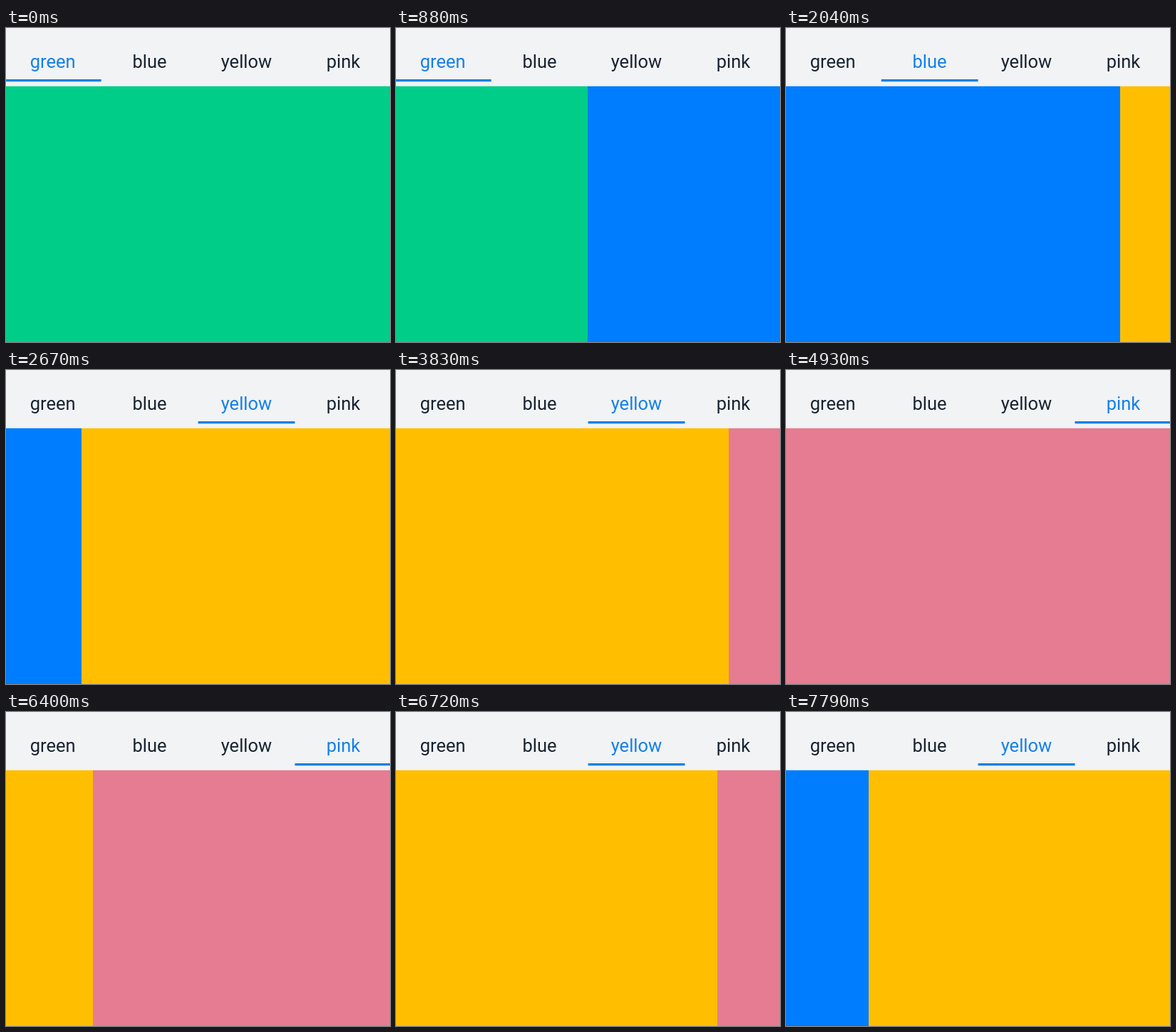
An HTML page for the animation above (8000 ms loop, 539 by 441 pixels).

```html
<!DOCTYPE html>
<html lang="en">
<head>
<meta charset="utf-8">
<title>Swipe tabs</title>
<style>
html, body { margin: 0; width: 100%; height: 100%; overflow: hidden; background: #f1f3f5; }
svg { display: block; width: 100%; height: 100%; }
text { font: 400 25.5px Roboto, sans-serif; text-anchor: middle; }
</style>
</head>
<body>
<svg id="stage" viewBox="0 0 539 441"></svg>
<script>
const LOOP = 8000, WIDTH = 539, HEIGHT = 441, TAB = 135.9, BAR = 81.8, SETTLE = 550;
const INK = '#182431', ACCENT = '#1480e8';
const PAGES = [['green', '#00cd87'], ['blue', '#007dff'], ['yellow', '#ffbf00'], ['pink', '#e67c92']];

// The finger drags by a share of the page from start to end; after release the page settles.
// Motion is choppy: the drag advances in `moves` jumps, settling once per `step` ms.
const SWIPES = [
  { page: 0, dir: 1, start: 500, end: 880, release: 960, from: 0.074, to: 0.501, moves: 1, step: 380 },
  { page: 1, dir: 1, start: 2040, end: 2440, release: 2590, from: 0.13, to: 0.488, moves: 1, step: 115 },
  { page: 2, dir: 1, start: 3830, end: 4140, release: 4290, from: 0.133, to: 0.404, moves: 4, step: 115 },
  { page: 3, dir: -1, start: 6400, end: 6550, release: 6720, from: 0.226, to: 0.503, moves: 1, step: 115 },
  { page: 2, dir: -1, start: 7790, end: LOOP, release: LOOP, from: 0.215, to: 0.5, moves: 1, step: 115 }
];

const stage = document.getElementById('stage');

function add(tag, attrs) {
  const node = document.createElementNS('http://www.w3.org/2000/svg', tag);
  for (const key in attrs) node.setAttribute(key, attrs[key]);
  return stage.appendChild(node);
}

add('rect', { width: WIDTH, height: HEIGHT, fill: '#f1f3f5' });
const panels = PAGES.map(([, fill]) => add('rect', { y: BAR, width: WIDTH, height: HEIGHT - BAR, fill }));
const labels = PAGES.map(([name], i) => {
  const label = add('text', { x: 65.7 + i * TAB, y: 55.5 });
  label.textContent = name;
  return label;
});
const underline = add('rect', { y: 72, width: TAB, height: 3.3, fill: ACCENT });

function dragged({ start, end, from, to, moves }, time) {
  const share = Math.min(1, (time - start) / (end - start));
  return from + (to - from) * Math.floor(share * moves) / moves;
}

function settled({ end, release, to, step }, time) {
  const shown = release + Math.floor((time - release) / step) * step;
  const left = Math.max(0, 1 - (shown - end) / SETTLE);
  return 1 - (1 - to) * left ** 3;
}

function draw(time) {
  const swipe = SWIPES.findLast(s => s.start <= time);
  let position = 0, selected = 0;
  if (swipe) {
    const { page, dir, release } = swipe;
    const released = time >= release;
    position = page + dir * (released ? settled : dragged)(swipe, time);
    selected = released ? page + dir : page;
  }
  panels.forEach((panel, i) => panel.setAttribute('x', Math.round((i - position) * WIDTH)));
  labels.forEach((label, i) => label.setAttribute('fill', i === selected ? ACCENT : INK));
  underline.setAttribute('x', -2.2 + selected * TAB);
}

const start = performance.now();
function tick() {
  draw((performance.now() - start) % LOOP);
  requestAnimationFrame(tick);
}
tick();
</script>
</body>
</html>
```
